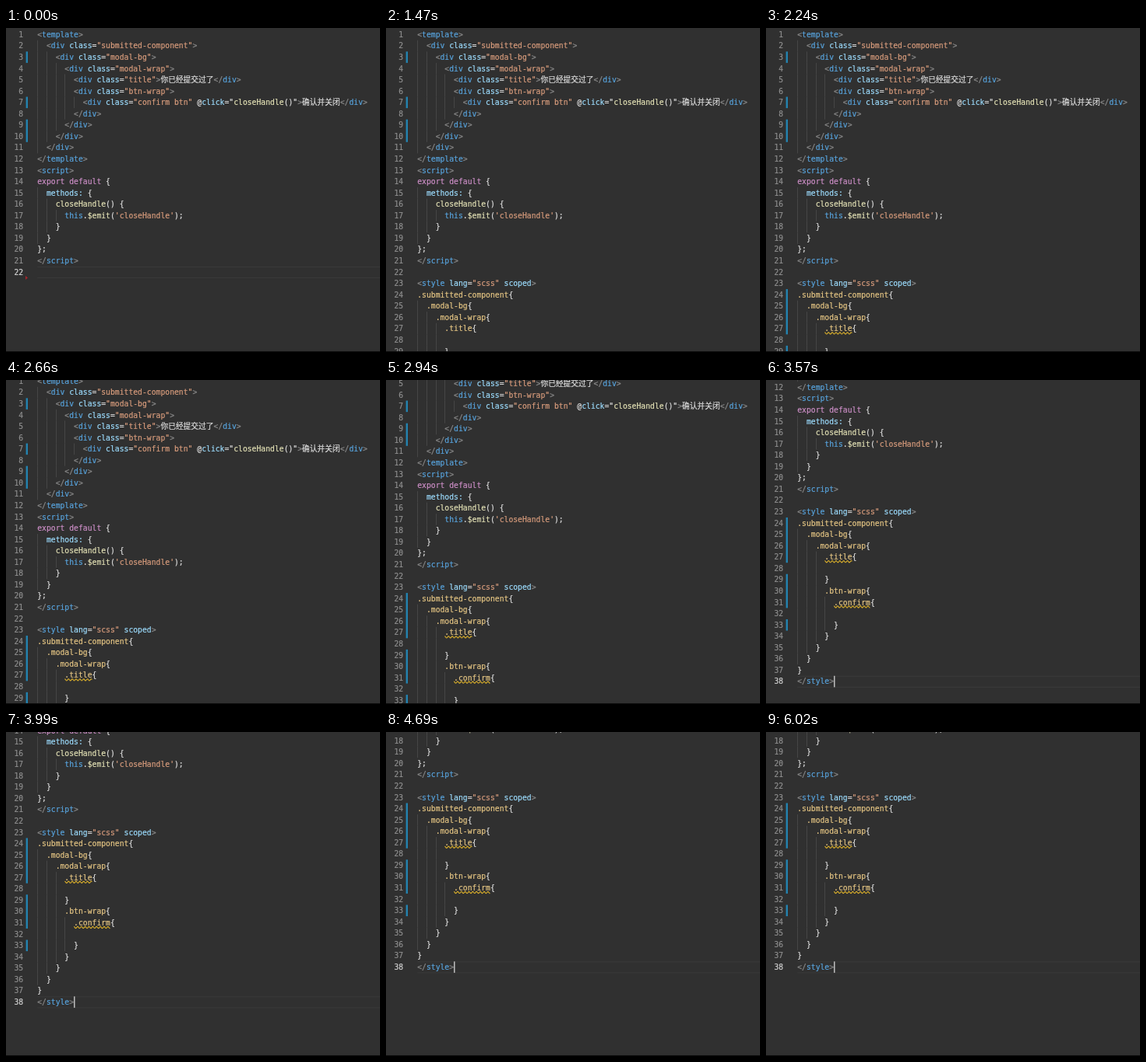
Recreate the animation shown at these times as an HTML page with a canvas. Size 480 by 417 pixels, loop 6090 ms.

```html
<!DOCTYPE html>
<html lang="zh">
<head>
<meta charset="utf-8">
<style>
html, body { margin: 0; width: 100%; height: 100%; overflow: hidden; background: #303030; }
canvas { display: block; width: 480px; height: 417px; }
</style>
</head>
<body>
<canvas id="stage" width="480" height="417"></canvas>
<script>
const ctx = document.getElementById('stage').getContext('2d');
const W = 480, H = 417, LOOP = 6090, STEP = 70;
const LEFT = 40.2, TOP = 1.2, ROW = 14.56, CHAR = 5.86, SIZE = 9.73;
const FONT = `${SIZE * 10}px "DejaVu Sans Mono", "Noto Sans CJK SC", "Noto Sans CJK", monospace`;

const PASTE = 1050, MARKS = 1680, LINT = 1820;
const SCROLL = [[2450, 0], [2660, 7], [3220, 117], [3710, 176], [3990, 199.6], [4340, 244.6]];

const SOURCE = `<template>
  <div class="submitted-component">
    <div class="modal-bg">
      <div class="modal-wrap">
        <div class="title">你已经提交过了</div>
        <div class="btn-wrap">
          <div class="confirm btn" @click="closeHandle()">确认并关闭</div>
        </div>
      </div>
    </div>
  </div>
</template>
<script>
export default {
  methods: {
    closeHandle() {
      this.$emit('closeHandle');
    }
  }
};
<\/script>

<style lang="scss" scoped>
.submitted-component{
  .modal-bg{
    .modal-wrap{
      .title{

      }
      .btn-wrap{
        .confirm{

        }
      }
    }
  }
}
</style>`;

const TEXT = '#dedede', GRAY = '#8a8a8a', BLUE = '#58a4de', SKY = '#9cdcfe';
const ORANGE = '#d89c7c', CREAM = '#e4e2b6', PINK = '#cc8ec6', GOLD = '#e6c684';

// Ordered rules: the first pattern that matches colours the token.
const MARKUP = [
  [/<\/?|>/y, GRAY],
  [/(?<=<\/?)\w+/y, BLUE],
  [/closeHandle/y, CREAM],
  [/"[\w -]+"/y, ORANGE],
  [/[a-z]+/y, SKY]
];
const SCRIPT = [
  [/export|default/y, PINK],
  [/methods:/y, SKY],
  [/this/y, BLUE],
  [/'\w+'/y, ORANGE],
  [/[$\w]+/y, CREAM]
];
const STYLE = [[/\.[\w-]+/y, GOLD]];

function rulesFor(line) {
  const s = line.trim();
  if (s[0] === '<') return MARKUP;
  return s[0] === '.' ? STYLE : SCRIPT;
}

function tokenize(line) {
  const rules = rulesFor(line), glyphs = [];
  let x = LEFT, i = 0;
  while (i < line.length) {
    let word = line[i], color = TEXT;
    for (const [re, c] of rules) {
      re.lastIndex = i;
      const m = re.exec(line);
      if (m) { word = m[0]; color = c; break; }
    }
    for (const ch of word) {
      if (ch !== ' ') glyphs.push({ ch, x, color });
      x += ch > '\u2e80' ? SIZE : CHAR;
    }
    i += word.length;
  }
  return glyphs;
}

const lines = SOURCE.split('\n');
const rows = lines.map((line, i) => {
  const near = line || lines[i + 1];
  return { glyphs: tokenize(line), guides: near.search(/\S/) / 2 };
});

const rowTop = n => TOP + (n - 1) * ROW;

function scrollAt(t) {
  for (let i = 1; i < SCROLL.length; i++) {
    const [t0, y0] = SCROLL[i - 1], [t1, y1] = SCROLL[i];
    if (t < t1) return y0 + (y1 - y0) * Math.max(0, (t - t0) / (t1 - t0));
  }
  return SCROLL[SCROLL.length - 1][1];
}

// Drawn at ten times the size and scaled down; a hairline stroke adds weight.
function glyph(ch, x, y, color) {
  ctx.save();
  ctx.translate(x, y);
  ctx.scale(0.1, 0.1);
  ctx.font = FONT;
  ctx.fillStyle = ctx.strokeStyle = color;
  ctx.lineWidth = 2;
  ctx.lineJoin = 'round';
  ctx.fillText(ch, 0, 0);
  ctx.strokeText(ch, 0, 0);
  ctx.restore();
}

function box(x, y, w, h, color) {
  ctx.fillStyle = color;
  ctx.fillRect(x, y, w, h);
}

function bar(first, last) {
  box(25.6, rowTop(first), 2.4, (last - first + 1) * ROW, '#2383b0');
}

function squiggle(n, col, count) {
  const x0 = LEFT + col * CHAR, y = rowTop(n) + 13.1;
  ctx.beginPath();
  for (let x = 0; x <= count * CHAR; x += 0.5) {
    ctx.lineTo(x0 + x, y - Math.cos(x * Math.PI / 2.43) * 1.1);
  }
  ctx.strokeStyle = '#dcb02a';
  ctx.lineWidth = 1.1;
  ctx.stroke();
}

function currentLine(n) {
  const y = rowTop(n);
  box(LEFT, y, W - LEFT, 1, '#3a3a3a');
  box(LEFT, y + 14, W - LEFT, 1, '#3a3a3a');
}

function cursorOn(t) {
  const phase = t < PASTE ? t + 90 : t - 70;
  return Math.floor(phase / 500) % 2 === 1;
}

function deletedMark(n) {
  const y = rowTop(n) + ROW;
  ctx.fillStyle = '#a3262c';
  ctx.beginPath();
  ctx.moveTo(25, y - 2.5);
  ctx.lineTo(28, y);
  ctx.lineTo(25, y + 2.5);
  ctx.fill();
}

function draw(t) {
  const pasted = t >= PASTE;
  const last = pasted ? rows.length : 22;
  const scroll = scrollAt(t);
  box(0, 0, W, H, '#303030');
  ctx.save();
  ctx.translate(0, -scroll);
  currentLine(last);

  for (let n = 1; n <= last; n++) {
    const y = rowTop(n);
    if (y - scroll > H || y + ROW < scroll) continue;
    const { glyphs, guides } = rows[n - 1];
    for (let g = 0; g < guides; g++) {
      box(Math.round(LEFT + g * 2 * CHAR), y, 1, ROW, '#464646');
    }
    const label = String(n);
    [...label].forEach((ch, i) => {
      glyph(ch, 22.2 - (label.length - i) * CHAR, y + 10.65, n === last ? '#d2d2d2' : '#8e8e8e');
    });
    for (const { ch, x, color } of glyphs) glyph(ch, x, y + 10.65, color);
  }

  bar(3, 3);
  bar(7, 7);
  bar(9, 10);
  if (!pasted) deletedMark(22);
  if (t >= MARKS) {
    bar(24, 27);
    bar(29, 31);
    bar(33, 33);
  }
  if (t >= LINT) {
    squiggle(27, 6, 6);
    squiggle(31, 8, 8);
  }
  if (cursorOn(t)) {
    box(LEFT + lines[last - 1].length * CHAR, rowTop(last), 1.4, ROW, '#c8c8c8');
  }
  ctx.restore();
  box(0, 416, W, 1, '#0c0c0c');
}

function tick(now) {
  draw(Math.floor((now % LOOP) / STEP) * STEP);
  requestAnimationFrame(tick);
}
draw(0);
requestAnimationFrame(tick);
</script>
</body>
</html>
```
